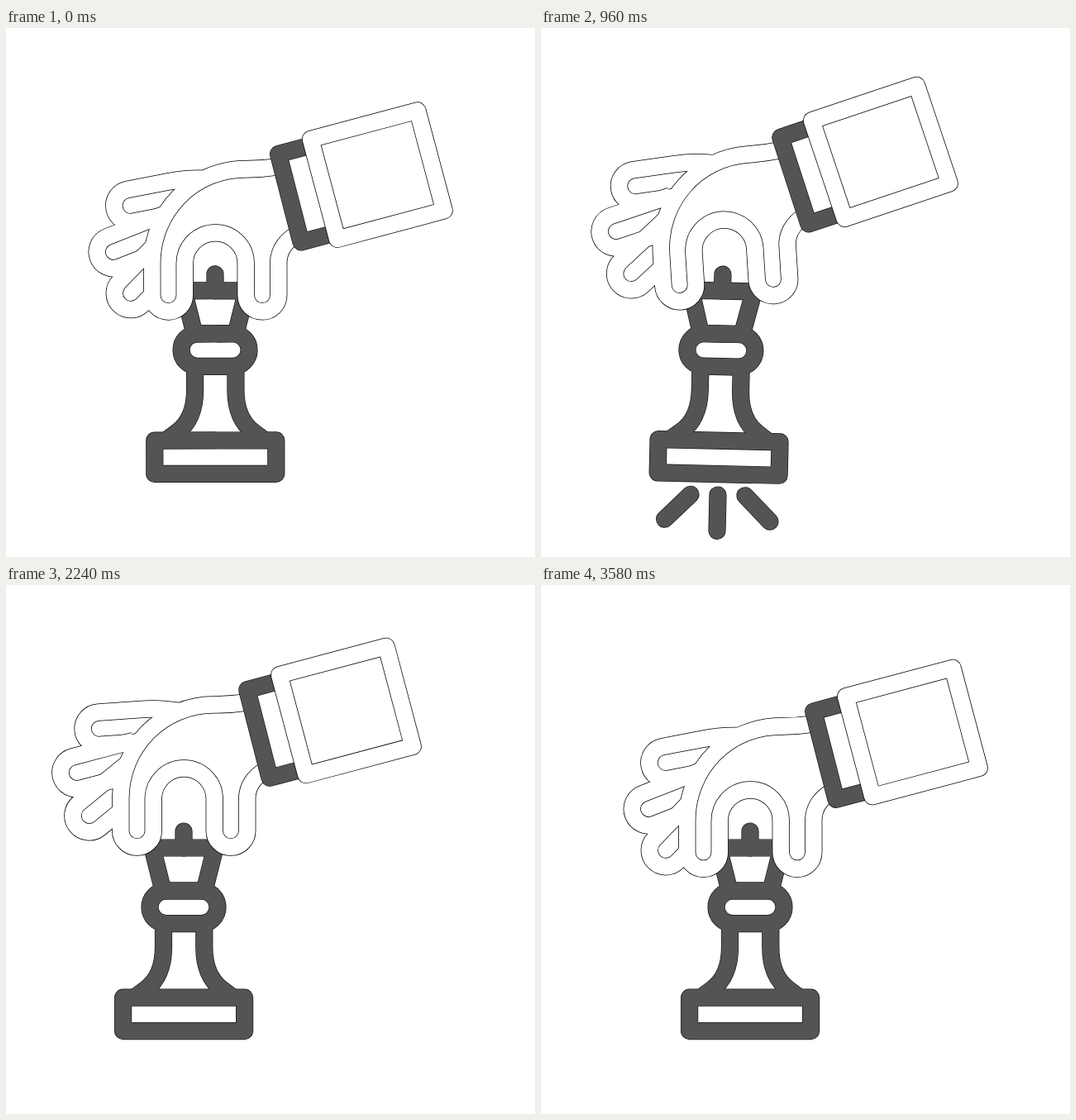
An HTML page that plays this animation: 640 px wide and 640 px high, repeating every 3600 ms.

```html
<!DOCTYPE html>
<html lang="en">
<head>
<meta charset="utf-8">
<title>Chess move</title>
<style>
  html, body { margin: 0; width: 100%; height: 100%; overflow: hidden; background: #fff; }
  svg { display: block; width: 100vw; height: 100vh; fill: none; stroke-linejoin: round; }
  .edge { stroke: #000; stroke-width: 21.3; }
  .white { stroke: #fff; stroke-width: 19.8; }
  .rim { stroke: #181818; stroke-width: 21.2; }
  .dark { stroke: #545454; stroke-width: 19.8; }
  #rays { stroke-linecap: round; }
</style>
</head>
<body>
<svg viewBox="0 0 640 640">
  <defs>
    <g id="man">
      <path d="M253 298V318" stroke-linecap="round"/>
      <path d="M215 318H291L278 370H228Z"/>
      <rect x="212" y="370" width="82" height="39.6" rx="19.8"/>
      <path id="side" d="M228.5 412V438C228.5 460 222 478 207 489L195 498"/>
      <use href="#side" transform="matrix(-1 0 0 1 506.3 0)"/>
      <rect x="179.6" y="499.2" width="147" height="40.4"/>
    </g>
    <path id="burst" d="M220 565L184 601M253 565V616M286 565L322 601"/>
    <g id="fan">
      <path d="M248 183Q222 181 196 186.2L146.8 195.6A19.75 19.75 0 0 0 154.2 234.4L213 223"/>
      <path d="M76-19.75H0A19.75 19.75 0 0 0 0 19.75H60" transform="translate(130 271) rotate(-21.5)"/>
      <path d="M88-19.75H0A19.75 19.75 0 0 0 0 19.75H54" transform="translate(151 321) rotate(-46)"/>
    </g>
    <path id="palm" d="M330 168Q310 171 290 171C226 171 176.75 222 176.75 285V323.5a19.75 19.75 0 0 0 39.5 0V285a37 37 0 0 1 74 0V323.5a19.75 19.75 0 0 0 39.5 0V284C330 270 338 258 352 250"/>
    <clipPath id="inside"><use href="#palm"/></clipPath>
    <path id="cuff" d="M372 141.5L329.75 152.9L357 259.3L400 248"/>
    <rect id="sleeve" x="368.75" y="134.9" width="133.8" height="125" transform="rotate(-14.9 368.75 134.9)"/>
  </defs>

  <g id="piece">
    <use href="#man" class="rim"/>
    <use href="#man" class="dark"/>
    <g id="rays">
      <use href="#burst" class="rim"/>
      <use href="#burst" class="dark"/>
    </g>
  </g>

  <g id="hand">
    <use href="#fan" class="edge"/>
    <use href="#palm" class="edge"/>
    <use href="#fan" class="white"/>
    <g clip-path="url(#inside)">
      <use href="#palm" class="edge" fill="#fff"/>
    </g>
    <use href="#palm" class="white"/>
    <use href="#cuff" class="rim"/>
    <use href="#cuff" class="dark"/>
    <use href="#sleeve" class="edge" fill="#fff"/>
    <use href="#sleeve" class="white"/>
  </g>
</svg>
<script>
  const LOOP = 3600, RAY = 51, ARM = 196;
  const el = id => document.getElementById(id);
  let t = 0;

  const ramp = (from, to) => Math.min(1, Math.max(0, (t - from) / (to - from)));
  const ease = (from, to) => { const u = ramp(from, to); return u * u * (3 - 2 * u); };
  const bump = (from, to) => Math.sin(Math.PI * ramp(from, to));

  function place(id, x, y, angle, cx, cy) {
    el(id).setAttribute('transform', `translate(${x} ${y}) rotate(${angle} ${cx} ${cy})`);
  }

  function drawMove() {
    // Shared by hand and piece: carry there and back, hop, swing
    const carry = -38 * (ease(0, 480) - ease(2840, 3200))
      - 15 * bump(250, 850) - 29.5 * bump(2400, 3180);
    const lift = -57 * bump(0, 800) - 74 * bump(2360, 3220);
    const swing = -6 * bump(0, 320) + 5.8 * bump(320, 1010) + 15 * bump(2360, 3200);

    // The piece hangs from the hand, then tilts on its own base once put down
    const arm = ARM * (1 - ease(640, 900) + ease(2000, 2300));
    const rad = swing * Math.PI / 180;
    place('piece', carry - arm * Math.sin(rad), lift + arm * (Math.cos(rad) - 1), swing, 253, 519);

    // The hand lets go, rises, reaches down and tightens its grip
    const rise = -16 * ease(640, 900) - 61 * ease(960, 1200)
      + 64 * ease(2000, 2340) + 13 * ease(2900, 3220);
    place('hand', carry + 10 * bump(800, 1250), lift + rise,
      swing - 5.9 * bump(760, 1400), 253.25, 323);

    const spread = 15.5 * ease(0, 600) - 9 * ease(680, 940)
      + 4 * ease(1000, 1500) - 10.5 * ease(2000, 2600);
    place('fan', 0, 0, spread, 278, 209);
  }

  // Rays shoot out on landing, then shrink away from the base
  function drawRays(landing) {
    const end = RAY * ramp(landing, landing + 80);
    const start = RAY * ramp(landing + 200, landing + 340);
    const style = el('rays').style;
    style.visibility = end > start ? 'visible' : 'hidden';
    style.strokeDasharray = `${Math.max(0.01, end - start)} 200`;
    style.strokeDashoffset = -start;
  }

  function draw() {
    t = performance.now() % LOOP;
    drawMove();
    drawRays(t < 2000 ? 893 : 3220);
    requestAnimationFrame(draw);
  }
  draw();
</script>
</body>
</html>
```
